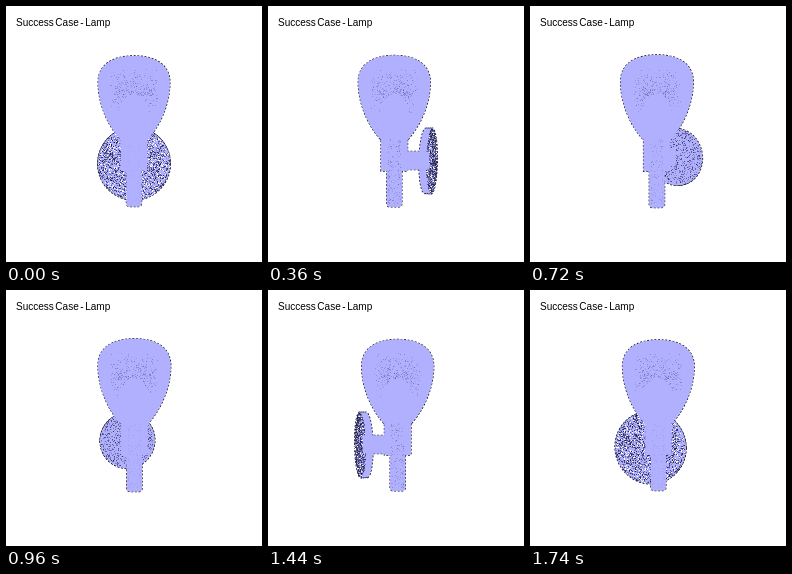
An HTML page with a canvas that plays this animation: 256x256 px, repeating every 1800 ms.

```html
<!DOCTYPE html>
<html lang="en">
<head>
<meta charset="utf-8">
<title>Lamp turntable</title>
<style>
  html, body { margin: 0; width: 100%; height: 100%; overflow: hidden; background: #fff; }
  canvas { display: block; }
</style>
</head>
<body>
<canvas id="stage" width="256" height="256"></canvas>
<script>
const ctx = document.getElementById('stage').getContext('2d');
const FILL = '#b0b0ff', TAU = Math.PI * 2;
const STEP = 60, FRAMES = 30;
const CAMERA = 247, REACH = 33.5, RADIUS = 30.9, PLATE_Y = 25.4, AXIS = 1.8;

let seed = 7;
const rnd = () => (seed = (seed * 16807) % 2147483647) / 2147483647;
const cloud = (n, make) => Array.from({ length: n }, make);

const plateDots = cloud(2700, () => ({ r: Math.sqrt(rnd()) * 30.6, a: rnd() * TAU, tone: rnd() }));
const shadeDots = cloud(460, () => ({
  r: 8 + rnd() * 16, a: rnd() * TAU, y: -66 + 24 * (rnd() + rnd()), tone: rnd()
}));
const postDots = cloud(150, () => ({ a: rnd() * TAU, y: 5 + rnd() * 65, tone: rnd() }));

function project(x, y, z) {
  const s = CAMERA / (CAMERA - z);
  return [128 + x * s, 128 + y * s];
}

// Point on the wall plate: distance along its axis, then polar position on its face.
function platePoint(turn, depth, r, a) {
  const s = Math.sin(turn), c = Math.cos(turn), u = r * Math.cos(a);
  return project(depth * s + u * c, PLATE_Y + r * Math.sin(a), depth * c - u * s);
}

function plateSlice(turn, depth) {
  const path = new Path2D();
  for (let i = 0; i < 60; i++) path.lineTo(...platePoint(turn, depth, RADIUS, i / 60 * TAU));
  path.closePath();
  return path;
}

function dot([x, y], color) {
  ctx.fillStyle = color;
  ctx.fillRect(Math.floor(x), Math.floor(y), 1, 1);
}

function bodyPath(turn) {
  const x = -AXIS * Math.sin(turn), z = -AXIS * Math.cos(turn);
  const k = CAMERA / (CAMERA - z);
  const shape = new Path2D();
  shape.moveTo(-14, 5);
  shape.bezierCurveTo(-25, -7, -36, -29, -36, -52);
  shape.bezierCurveTo(-36, -70, -21, -78.6, 0, -78.6);
  shape.bezierCurveTo(21, -78.6, 36, -70, 36, -52);
  shape.bezierCurveTo(36, -29, 25, -7, 14, 5);
  shape.closePath();
  shape.rect(-13.2, 3, 26.4, 34);
  shape.roundRect(-7.5, 30, 15, 43, 3);
  const path = new Path2D();
  path.addPath(shape, new DOMMatrix([k, 0, 0, k, 128 + x * k, 128]));
  return path;
}

function armPath(turn) {
  const [x, y] = platePoint(turn, REACH, 0, 0);
  const path = new Path2D();
  path.rect(Math.min(x, 128), y - 9, Math.abs(x - 128), 18);
  return path;
}

function draw(turn) {
  const s = Math.sin(turn), c = Math.cos(turn), front = Math.max(0, c);
  ctx.fillStyle = '#fff';
  ctx.fillRect(0, 0, 256, 256);

  const plate = [-3, -1, 1, 3].map(d => plateSlice(turn, REACH + d));
  const body = bodyPath(turn), arm = armPath(turn);
  const parts = [...plate, arm, body];

  // Stroking every part before filling leaves only the joint silhouette.
  ctx.strokeStyle = '#10101c';
  ctx.lineWidth = 1.5;
  ctx.setLineDash([2, 1.6]);
  parts.forEach(p => ctx.stroke(p));
  ctx.setLineDash([]);
  ctx.fillStyle = FILL;
  parts.forEach(p => ctx.fill(p));

  const count = 260 + 640 * Math.abs(c) + 1800 * front;
  for (const p of plateDots.slice(0, count)) {
    const white = p.tone > 1 - 0.2 * front;
    const alpha = 0.1 + (0.5 + 0.4 * front) * p.tone;
    dot(platePoint(turn, REACH + 3, p.r, p.a), white ? '#fff' : `rgba(20,20,50,${alpha})`);
  }

  ctx.fillStyle = FILL;
  ctx.fill(arm);
  ctx.fill(body);

  const cx = -AXIS * s;
  for (const p of shadeDots) {
    const x = p.r * Math.sin(p.a + turn);
    if ((x / 14) ** 2 + ((p.y + 22) / 18) ** 2 < 1) continue;
    dot(project(cx + x, p.y, 0), `rgba(30,30,70,${0.3 * p.tone})`);
  }
  for (const p of postDots) {
    const alpha = (0.04 + 0.3 * Math.abs(s)) * p.tone;
    dot(project(cx + 6 * Math.sin(p.a + turn), p.y, 0), `rgba(30,30,70,${alpha})`);
  }

  ctx.fillStyle = '#000';
  ctx.font = '10px "Liberation Sans", Arial, sans-serif';
  ctx.wordSpacing = '-1.2px';
  ctx.fillText('Success Case - Lamp', 10, 20);
}

function tick() {
  const frame = Math.floor(performance.now() / STEP) % FRAMES;
  draw(frame / FRAMES * TAU);
  requestAnimationFrame(tick);
}
tick();
</script>
</body>
</html>
```
